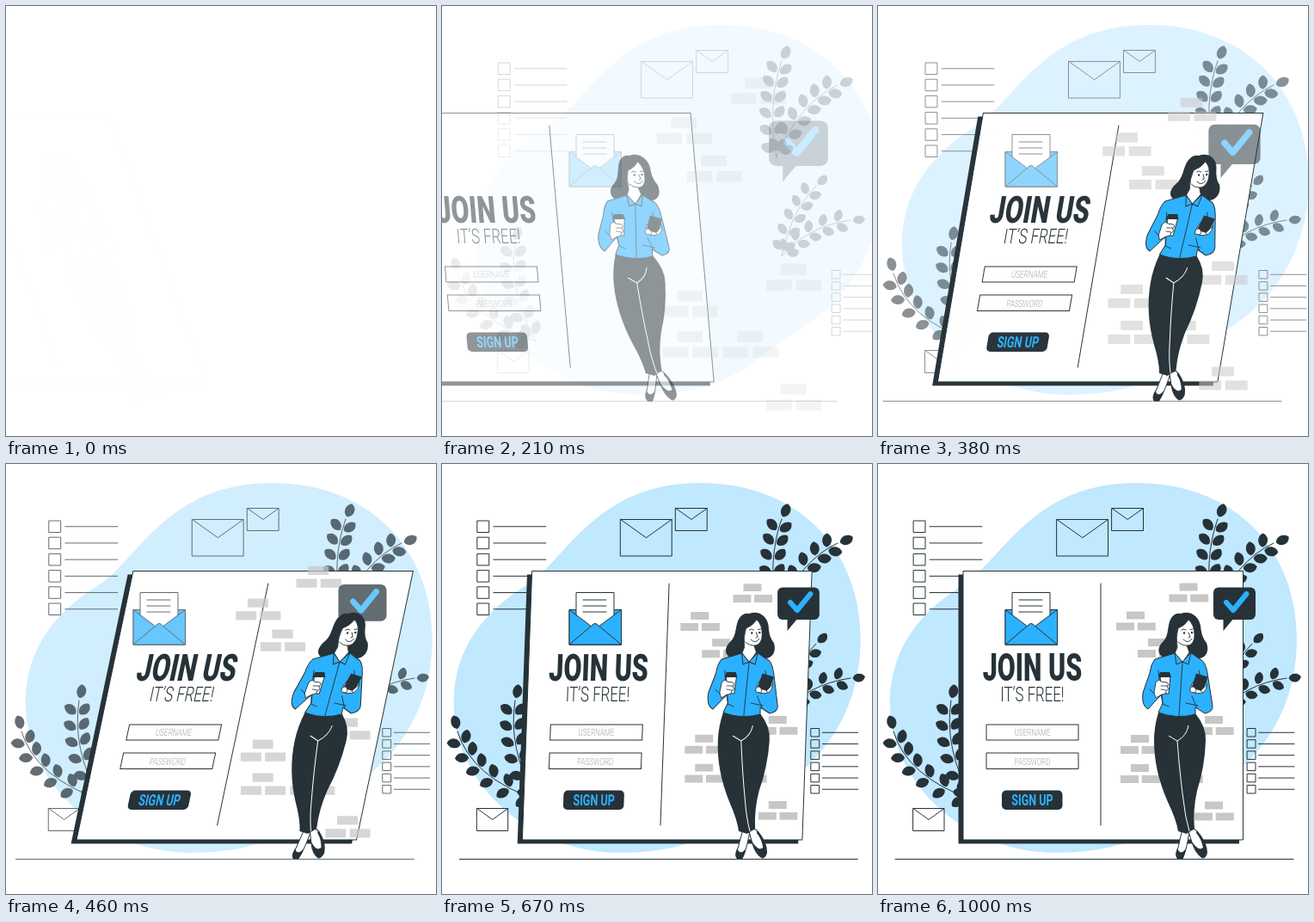
Animation, 500 px wide and 500 px high, one loop 1040 ms. Source, as an HTML page:

```html
<!DOCTYPE html>
<html lang="en">
<head>
<meta charset="utf-8">
<title>Join us</title>
<style>
html, body { margin: 0; width: 100%; height: 100%; overflow: hidden; background: #fff; }
svg { display: block; width: 100vw; height: 100vh; }
text { font-family: Roboto, "Open Sans", sans-serif; text-anchor: middle; }
.line { fill: none; stroke: #263238; stroke-linecap: round; stroke-linejoin: round; }
.dark { fill: #263238; }
.blue { fill: #2cb1ff; }
.paper { fill: #fff; stroke: #263238; }
.trim { stroke: #263238; stroke-linejoin: round; }
</style>
</head>
<body>
<svg viewBox="0 0 500 500">
  <g id="back">
    <path fill="#c0e8ff" d="M14 278C14 207 59 164 105 137C148 103 185 22 300 22C420 22 487 105 487 203C487 290 440 350 385 380C345 402 320 452 207 452C100 452 14 370 14 278Z"/>
    <g id="outlines" class="line"></g>
  </g>
  <g id="plants"></g>
  <g id="floor"><path class="line" d="M20 459.5H483"/></g>
  <g id="panel">
    <path class="dark" d="M93.5 128.5H420V441.5H93.5Z"/>
    <path class="paper" d="M99 124.5H424.5V437H99Z"/>
    <path class="line" d="M259 139V420"/>
  </g>
  <g id="form">
    <path class="paper" d="M126 303H233V321H126ZM126 336H233V354.5H126Z"/>
    <rect class="dark" x="144" y="379.5" width="70.5" height="22.5" rx="5"/>
  </g>
  <g id="bricks" fill="#c7c7c7"></g>
  <g id="mail">
    <path class="blue trim" d="M148 169.5H208.5V210H148Z"/>
    <path class="paper" d="M156 149.5H200V196H156Z"/>
    <path class="line" d="M164 158H191M164 165H191M164 172H191"/>
    <path class="blue trim" d="M148 169.5L178 192L208.5 169.5V210H148Z"/>
    <path class="blue trim" d="M148 210L174 188Q178 183 182 188L208.5 210Z"/>
  </g>
  <g id="bubble">
    <rect class="dark" x="390" y="143.5" width="49" height="37.5" rx="6"/>
    <path class="dark" d="M401.5 178V194L414 179Z"/>
    <path fill="none" stroke="#2cb1ff" stroke-width="6" stroke-linecap="round" stroke-linejoin="round" d="M405 161L413 170L428.5 151"/>
  </g>
  <g id="woman">
    <!-- feet -->
    <path class="paper" d="M354 424L349 446Q345 455 349 459H354Q359 449 362 427Z"/>
    <path class="dark" d="M348 447Q344 457 349 459.5H354Q357 455 358 447Q352 456 348 447Z"/>
    <path class="paper" d="M360 424L365 440Q370 455 377 457L380 441L369 425Z"/>
    <path class="dark" d="M371 426Q383 440 383 452Q381 460 376 458Q368 450 365 439Q373 451 378 446Q376 436 370 429Z"/>
    <!-- trousers -->
    <path class="dark" d="M326 289Q348 297 369 290Q382 306 381 322Q380 352 371 380Q366 402 368 424L359 430L349 427Q347 414 337 393Q321 357 321 322Q321 305 326 289Z"/>
    <path fill="none" stroke="#fff" d="M338 316L348 322Q359 316 361 304M348 322C350 348 352 368 355 390Q357 410 362 427"/>
    <!-- hair, face -->
    <path class="dark" d="M352 174C363 170 373 177 375 188C376 198 378 203 382 208C386 219 380 227 371 226L338 227C324 224 324 214 331 207C339 200 336 186 341 179Q345 173 352 174Z"/>
    <path class="paper" stroke-width=".8" d="M349 191Q357 188 361 181Q368 187 368 199C368 208 363 211.500 359 211L362 219L354 231L345 221L348 213Q346 201 349 191Z"/>
    <path class="line" stroke-width=".9" d="M353 193Q355 191 358 193M363 192.500L366 192M361 196L363 201L361 202M355 204Q361 210 365 203M349 207Q353 211 359 211"/>
    <circle class="dark" cx="356" cy="196.500" r="1.200"/>
    <circle class="dark" cx="365" cy="196" r="1.200"/>
    <!-- shirt -->
    <path class="blue trim" d="M345 220L322 227Q317 233 316 243L308 266Q306 281 314 285L324 274L330 268L331 278L326 289Q348 297 369 291V283L380 290Q390 288 389 281L383 243Q381 229 373 226L363 219L354 231Z"/>
    <path class="blue trim" d="M345 219.500L347 233L354 230L361 233L364 219L354 230Z"/>
    <path class="line" stroke-width=".9" d="M354 231L350 293M326 240L329 268L331 278M373 240L375 248M365 270L371 284M358 278L372 281M331 279L338 282M316 262L322 268"/>
    <!-- cup -->
    <path class="paper" d="M328 247L330 267H338L340 247Z"/>
    <path class="dark" d="M328 242H339L341 248H326Z"/>
    <path class="paper" stroke-width=".9" d="M321 266L323 254Q327 249 329 253L336 254Q339 256 336 259Q339 262 335 264Q335 268 330 268L323 272Z"/>
    <path class="line" stroke-width=".8" d="M329 258H336M329 262L335 263"/>
    <!-- phone -->
    <path class="paper" stroke-width=".9" d="M363 264Q364 254 369 251L381 252Q384 259 379 265Q372 269 363 264Z"/>
    <path class="dark" d="M370 243.500L383.500 247.500L378 264.500L364.500 260.500Z"/>
    <path class="paper" stroke-width=".8" d="M363 261Q366 257 369 261Q371 264 369 266L363 265ZM379 260L382 256Q383 262 378 266L375 264Z"/>
  </g>
</svg>
<script>
const $ = id => document.getElementById(id);
const add = (id, markup) => $(id).insertAdjacentHTML('beforeend', markup);

// Checklists and outlined envelopes
function list(x, y, size, gap, end) {
  let d = '';
  for (let i = 0; i < 6; i++, y += gap)
    d += `M${x} ${y}h${size}v${size}h${-size}zM${x + size * 1.38} ${y + size / 2}H${end}`;
  return d;
}
const envelope = (x, y, w, h) =>
  `M${x} ${y}h${w}v${h}h${-w}zl${w / 2} ${h / 2}l${w / 2} ${-h / 2}`;
add('outlines', `<path d="${list(41.5, 66, 13.5, 19.2, 121)}${list(429.5, 307.5, 9.5, 13.2, 484)}
  ${envelope(208, 64.5, 59.5, 42.5)}${envelope(272, 51.5, 36.5, 26)}${envelope(41, 400.5, 36, 26)}"/>`);

// A curved stem with leaf pairs and one leaf at the tip
function plant(x0, y0, cx, cy, x1, y1, pairs, size) {
  const leaf = (x, y, angle) =>
    `<path transform="translate(${x} ${y}) rotate(${angle}) scale(${size / 18})" d="M0 0L3 0C5-7 15-8 19-2C17 7 6 7 3 0"/>`;
  const at = (t, a, b, c) => (1 - t) ** 2 * a + 2 * t * (1 - t) * b + t * t * c;
  const slope = (t, a, b, c) => (1 - t) * (b - a) + t * (c - b);
  let out = `<path class="line" d="M${x0} ${y0}Q${cx} ${cy} ${x1} ${y1}"/>`;
  for (let i = 0; i <= pairs; i++) {
    const t = (i + .3) / (pairs + .3);
    const x = at(t, x0, cx, x1), y = at(t, y0, cy, y1);
    const dir = Math.atan2(slope(t, y0, cy, y1), slope(t, x0, cx, x1)) * 180 / Math.PI;
    out += i < pairs ? leaf(x, y, dir - 48) + leaf(x, y, dir + 48) : leaf(x, y, dir + 8);
  }
  add('plants', `<g class="dark">${out}</g>`);
}
plant(389, 177, 378, 110, 395, 64, 6, 18);
plant(388, 177, 416, 112, 460, 92, 6, 18);
plant(395, 291, 405, 240, 435, 209, 5, 16);
plant(395, 291, 425, 256, 475, 249, 5, 16);
plant(109, 390, 76, 330, 85, 275, 6, 18);
plant(109, 390, 34, 364, 18, 311, 6, 18);

for (const [x, y] of [[338.5, 138.5], [277, 171.5], [302, 203], [368, 293],
                      [282, 315], [282, 349], [332, 349], [368, 392.5]])
  add('bricks', `<path d="M${x + 12} ${y}h21v9h-21zM${x} ${y + 13}h21v9h-21zM${x + 24.7} ${y + 13}h21v9h-21z"/>`);

// One condensed setting for all lettering
const label = (y, size, weight, fill, words) => add('form',
  `<text transform="translate(179.5 ${y}) scale(.7 1)" font-size="${size}" font-weight="${weight}" fill="${fill}">${words}</text>`);
label(252, 43.5, 900, '#263238', 'JOIN US');
label(276, 24, 300, '#263238', 'IT’S FREE!');
label(316, 11.5, 300, '#a6a6a6', 'USERNAME');
label(349.5, 11.5, 300, '#a6a6a6', 'PASSWORD');
label(396.5, 18, 700, '#2cb1ff', 'SIGN UP');

// cubic-bezier(.36, -.01, .5, 1.38)
function ease(s) {
  if (s <= 0 || s >= 1) return s <= 0 ? 0 : 1;
  const curve = (u, a, b) => 3 * (1 - u) ** 2 * u * a + 3 * (1 - u) * u * u * b + u ** 3;
  let lo = 0, hi = 1;
  for (let i = 0; i < 24; i++) {
    const mid = (lo + hi) / 2;
    if (curve(mid, .36, .5) < s) lo = mid; else hi = mid;
  }
  return curve((lo + hi) / 2, -.01, 1.38);
}

const tan = deg => Math.tan(deg * Math.PI / 180);
const mix = (a, b, p) => a + (b - a) * p;

function pose(id, opacity, transform = '') {
  $(id).setAttribute('opacity', Math.min(1, Math.max(0, opacity)));
  $(id).setAttribute('transform', transform);
}

function draw(now) {
  // 25 steps per loop
  const step = Math.floor((now % 1040 + 9) / 41.6) % 25;
  const s = Math.min(1, (step + .6) / 24);
  const p = ease(s), enter = ease(s / .6);

  pose('back', p, `translate(${30 * (1 - p)} 0)`);
  pose('floor', p, `translate(${-30 * (1 - p)} 0)`);
  pose('plants', p);
  pose('mail', p);
  const zoom = (id, x, y) =>
    pose(id, p, `translate(${x} ${y}) scale(${mix(1.5, 1, p)}) translate(${-x} ${-y})`);
  zoom('bricks', 345, 276);
  zoom('bubble', 414.5, 168.5);

  // Rush in from the left, lean past upright, settle
  const lean = s < .6 ? mix(tan(20), tan(-10), enter)
    : s < .8 ? tan(mix(-10, 2, ease((s - .6) / .2)))
    : tan(mix(2, 0, ease((s - .8) / .2)));
  const shift = -250 * (1 - enter);
  for (const [id, mid] of [['panel', 281], ['form', 311], ['woman', 316]])
    pose(id, enter, `matrix(1 0 ${lean} 1 ${shift - lean * mid} 0)`);
}

const start = performance.now();
function tick() {
  draw(performance.now() - start);
  requestAnimationFrame(tick);
}
tick();
</script>
</body>
</html>
```
